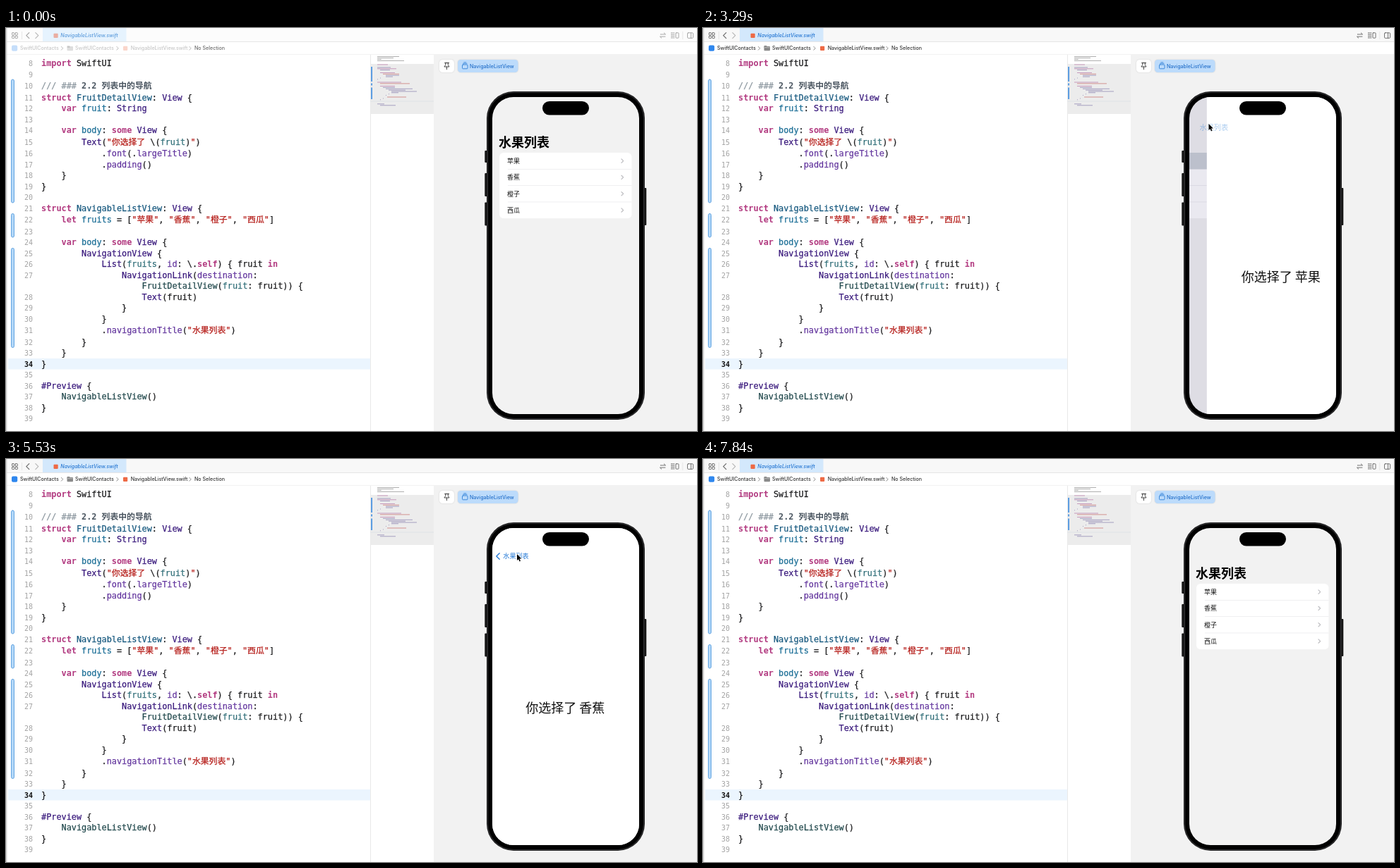
Write an HTML page with a canvas that moves like this. It is 979 by 572 pixels and loops after 7.98 s.

```html
<!DOCTYPE html>
<html lang="zh-CN">
<head>
<meta charset="utf-8">
<title>列表中的导航</title>
<style>
html, body { margin: 0; width: 100%; height: 100%; overflow: hidden; background: #fff; }
canvas { display: block; width: 979px; height: 572px; }
</style>
</head>
<body>
<canvas id="stage"></canvas>
<script>
const W = 979, H = 572, LOOP = 7980, STEP = 70;
const canvas = document.getElementById('stage');
const c = canvas.getContext('2d');
const dpr = window.devicePixelRatio || 1;
canvas.width = W * dpr;
canvas.height = H * dpr;

const CJK = '"Noto Sans CJK SC", "Noto Sans CJK", sans-serif';
const UI = 'Inter, ' + CJK;
const MONO = '"DejaVu Sans Mono", "Noto Sans CJK SC", "Noto Sans CJK", monospace';
const BLUE = [36, 121, 214];

const clamp = v => Math.max(0, Math.min(1, v));
const lerp = (a, b, k) => a + (b - a) * k;

function rect(x, y, w, h, fill) {
  c.fillStyle = fill;
  c.fillRect(x, y, w, h);
}

function round(x, y, w, h, r, fill, stroke, width = 1) {
  c.beginPath();
  c.roundRect(x, y, w, h, r);
  if (fill) { c.fillStyle = fill; c.fill(); }
  if (stroke) { c.strokeStyle = stroke; c.lineWidth = width; c.stroke(); }
}

function line(points, color, width = 1) {
  c.beginPath();
  for (let i = 0; i < points.length; i += 2) c.lineTo(points[i], points[i + 1]);
  c.strokeStyle = color;
  c.lineWidth = width;
  c.lineCap = c.lineJoin = 'round';
  c.stroke();
}

// dir: 1 points right, -1 points left
function chevron(x, y, s, dir, color, width) {
  line([x - dir * s / 2, y - s, x + dir * s / 2, y, x - dir * s / 2, y + s], color, width);
}

function text(s, x, y, font, color, align = 'left') {
  c.font = font;
  c.fillStyle = color;
  c.textAlign = align;
  c.fillText(s, x, y);
}

// ---- code editor ----
const INK = {
  k: '#b23a80', d: '#17597f', v: '#1b6e96', b: '#1c1c1e', t: '#3a1a7d',
  m: '#65389f', s: '#b51c18', u: '#33707a', p: '#234a4e', c: '#8c979f', h: '#4b5661'
};
const CODE = [
  '~kimport ~bSwiftUI',
  '',
  '~c/// ### ~h2.2 列表中的导航',
  '~kstruct ~dFruitDetailView~b: ~tView~b {',
  '    ~kvar ~vfruit~b: ~tString',
  '',
  '    ~kvar ~vbody~b: ~ksome ~tView~b {',
  '        ~tText~b(~s"你选择了 ~b\\(~ufruit~b)~s"~b)',
  '            ~b.~mfont~b(.~mlargeTitle~b)',
  '            ~b.~mpadding~b()',
  '    ~b}',
  '~b}',
  '',
  '~kstruct ~dNavigableListView~b: ~tView~b {',
  '    ~klet ~vfruits~b = [~s"苹果"~b, ~s"香蕉"~b, ~s"橙子"~b, ~s"西瓜"~b]',
  '',
  '    ~kvar ~vbody~b: ~ksome ~tView~b {',
  '        ~tNavigationView~b {',
  '            ~tList~b(~ufruits~b, ~mid~b: \\.~kself~b) { fruit ~kin',
  '                ~tNavigationLink~b(~mdestination~b:',
  '                    ~pFruitDetailView~b(~ufruit~b: fruit)) {',
  '                    ~tText~b(fruit)',
  '                ~b}',
  '            ~b}',
  '            ~b.~mnavigationTitle~b(~s"水果列表"~b)',
  '        ~b}',
  '    ~b}',
  '~b}',
  '',
  '~t#Preview~b {',
  '    ~pNavigableListView~b()',
  '~b}',
  ''
];
const WRAPPED = 20;

function drawCode() {
  rect(0, 38, 516, H - 38, '#fff');
  rect(3, 469, 513, 15.5, '#ebf5fe');
  for (const [y, h] of [[73, 175], [263.5, 33.5], [312.5, 141]])
    round(7.5, y, 4, h, 2, '#b4d8f8', '#5a9fdf', 0.9);

  let top = 42.25;
  CODE.forEach((src, i) => {
    const height = /[\u4e00-\u9fff]/.test(src) ? 17.5 : 15.5;
    const y = top + height / 2 + 4.2;
    top += height;
    if (i !== WRAPPED) {
      const n = i + (i < WRAPPED ? 8 : 7);
      text(n, 38, y, (n === 34 ? 'bold ' : '') + '10px ' + MONO, n === 34 ? '#111' : '#a3a3a3', 'right');
    }
    let x = 50;
    const parts = src.split(/~(.)/);
    parts.forEach((part, j) => {
      if (j % 2) return;
      const kind = j ? parts[j - 1] : 'b';
      const bold = kind === 'k' || kind === 'h';
      text(part, x, y, (bold ? 'bold ' : '') + '11.85px ' + MONO, INK[kind]);
      if (!bold) {
        // a hairline outline gives the medium weight
        c.strokeStyle = INK[kind];
        c.lineWidth = 0.25;
        c.lineJoin = 'round';
        c.strokeText(part, x, y);
      }
      x += c.measureText(part).width;
    });
  });
}

function drawMinimap() {
  rect(516, 38, 90, H - 38, '#fff');
  rect(516, 51, 90, 71, '#ececec');
  rect(516, 38, 1, H - 38, '#e9e9e9');
  rect(516, 103.5, 90, 1, '#dfe3e7');
  for (const [y, h] of [[55, 21], [78.5, 3], [84.5, 16.5]]) rect(517.2, y, 1.8, h, '#4d94e0');
  for (const [y, w] of [[40, 31], [42, 23], [44, 6], [46, 38]]) rect(526, y, w, 0.9, '#a5a5a5');
  // y, indent, width, tone
  const rows = [
    [51.5, 0, 15, 0], [55.5, 0, 19, 1], [57.3, 0, 27, 0], [59.1, 4, 14, 1], [63, 4, 21, 0],
    [64.8, 8, 23, 2], [66.7, 12, 19, 1], [68.6, 12, 10, 1], [70.5, 4, 1, 1], [72.3, 0, 1, 1],
    [76.5, 0, 34, 0], [78.4, 4, 42, 2], [82, 4, 21, 0], [83.9, 8, 17, 1], [85.8, 12, 38, 1],
    [87.7, 16, 24, 1], [89.5, 20, 36, 1], [91.3, 20, 10, 1], [93.2, 16, 1, 1], [95, 12, 1, 1],
    [97.5, 14, 27, 2], [99.5, 8, 1, 1], [101.3, 4, 1, 1], [107.3, 0, 10, 1], [109.3, 4, 22, 1]
  ];
  const tones = ['#c79abb', '#a59fc0', '#d3928f'];
  for (const [y, x, w, tone] of rows) rect(526 + x, y, w, 1, tones[tone]);
}

function drawBars(active) {
  const faint = active ? 1 : 0.28;
  rect(0, 0, W, 19.5, active ? '#f8f8f8' : '#fcfcfc');
  rect(52, 0, 118.5, 19.5, active ? '#d3e8fc' : '#e6f3fe');
  rect(0, 19, W, 1, '#e6e6e6');
  rect(0, 20, W, 18, '#fff');
  rect(0, 37.3, W, 0.7, '#ececec');

  const gray = active ? '#656565' : '#a0a0a0';
  for (const x of [8.5, 13.2]) for (const y of [6.7, 11.3]) round(x, y, 3.3, 3.3, 0.7, null, gray, 0.9);
  chevron(30.8, 10.7, 4, -1, gray, 1.1);
  chevron(43.8, 10.7, 4, 1, '#b4b4b4', 1.1);
  rect(22, 5, 0.7, 11, '#dedede');

  line([927, 9, 934.5, 9, 932.3, 7], gray, 0.9);
  line([934, 12.2, 926.5, 12.2, 928.7, 14.2], gray, 0.9);
  for (const y of [7, 9.3, 11.6, 13.9]) line([942, y, 947, y], gray, 0.9);
  round(949, 6.8, 4, 7.4, 0.8, null, gray, 0.9);
  rect(958.5, 5, 0.7, 11, '#dedede');
  round(965.5, 6.8, 8, 7.6, 1.2, null, gray, 0.9);
  line([970.5, 7, 970.5, 14.2], gray, 0.9);

  c.globalAlpha = active ? 1 : 0.5;
  round(67.5, 7.7, 6.2, 6.2, 1, '#ee6a45');
  c.globalAlpha = 1;
  text('NavigableListView.swift', 77.3, 13.3, 'italic 500 7.1px ' + UI, active ? '#2476d2' : '#5b9bdb');

  c.globalAlpha = faint;
  round(8, 24.5, 8.2, 8.2, 2, '#2f87ee');
  round(86.5, 26, 8.5, 6.2, 1, '#8a8a8a');
  round(86.5, 25, 4, 3, 0.8, '#8a8a8a');
  rect(87, 27.3, 7.5, 0.6, '#d0d0d0');
  round(166, 25.7, 6.2, 6.2, 1, '#ee6a45');
  const font = '500 7.1px ' + UI;
  text('SwiftUIContacts', 20, 31.3, font, '#333');
  text('SwiftUIContacts', 98, 31.3, font, '#333');
  text('NavigableListView.swift', 176.7, 31.3, font, '#333');
  c.globalAlpha = 1;
  text('No Selection', 267, 31.3, font, active ? '#333' : '#6a6a6a');
  for (const x of [79.5, 158, 261]) chevron(x, 28.8, 2.4, 1, active ? '#6f6f6f' : '#a8a8a8', 0.8);
  rect(0, 0, 1.5, H, '#d6d6d6');
}

// ---- preview pane ----
function drawPreviewPane() {
  rect(606, 38, W - 606, H - 38, '#f2f2f2');
  c.shadowColor = 'rgba(0,0,0,.16)';
  c.shadowBlur = 2 * dpr;
  round(614, 45, 21, 18, 4.5, '#fff');
  round(640, 45, 85.5, 18, 4.5, '#bcdbfb');
  c.shadowColor = 'transparent';
  line([621.5, 49.5, 627.5, 49.5], '#333', 1);
  line([622.8, 49.7, 622.6, 52.7, 620.9, 55, 628, 55, 626.4, 52.7, 626.2, 49.7], '#333', 0.9);
  line([624.5, 55, 624.5, 58.7], '#333', 0.9);
  round(646.5, 52, 7.5, 5.8, 1, null, '#2f7fd6', 0.9);
  line([647.5, 50.3, 653, 50.3], '#2f7fd6', 0.8);
  line([648.7, 48.8, 651.8, 48.8], '#2f7fd6', 0.8);
  text('NavigableListView', 657, 56.7, '500 7.1px ' + UI, '#236fc9');
}

function drawPhoneBody() {
  for (const [y, h] of [[174, 17], [206, 33], [247.5, 33]]) round(678.3, y, 4, h, 1, '#161616');
  round(903.5, 227, 3.8, 53, 1, '#161616');
  round(681, 90, 224, 466, 38, '#1d1d1e');
  round(682.5, 91.5, 221, 463, 36.5, '#030303', '#3c3c3e', 0.8);
  round(684, 93, 218, 460, 35, '#000');
}

const FRUITS = ['苹果', '香蕉', '橙子', '西瓜'];
const ROW = 23.3, LIST_TOP = 177;

function drawList(shift, selected, glow) {
  c.save();
  c.translate(shift, 0);
  c.save();
  c.beginPath();
  c.roundRect(699, LIST_TOP, 187.5, ROW * 4, 6);
  c.clip();
  rect(699, LIST_TOP, 188, ROW * 4, '#fff');
  for (let i = 1; i < 4; i++) rect(711, LIST_TOP + i * ROW - 0.3, 176, 0.7, '#e9e9eb');
  if (glow > 0) {
    c.globalAlpha = glow;
    rect(699, LIST_TOP + selected * ROW, 188, ROW, '#cdd2d8');
  }
  c.restore();
  FRUITS.forEach((name, i) => {
    const y = LIST_TOP + (i + 0.5) * ROW;
    text(name, 710, y + 3.5, '500 9px ' + CJK, '#111');
    chevron(873.3, y, 2.7, 1, '#b9b9bd', 1.1);
  });
  c.restore();
}

// The large title shrinks into the back button as the detail page arrives.
function drawTitle(p, popping, pressed) {
  const size = lerp(18, 9.1, p);
  const k = clamp(p * 1.4);
  const rgb = BLUE.map(v => Math.round(v * k));
  const weight = p > 0.8 ? 400 : p > 0.4 ? 500 : 700;
  const pushAlpha = 1 - 0.8 * p * (1 - p);
  c.globalAlpha = pressed ? 0.35 : popping ? lerp(1, 0.3, p) : pushAlpha;
  text('水果列表', lerp(698, 704.3, p), lerp(162.3, 138, p) + size * 0.37, weight + ' ' + size + 'px ' + CJK, `rgb(${rgb})`);
  c.globalAlpha *= clamp((p - 0.9) * 10) * (popping && !pressed ? 0.2 : 1);
  chevron(697, 138, 4.3, -1, `rgb(${BLUE})`, 1.4);
  c.globalAlpha = 1;
}

function drawScreen({ p, selected, glow, popping, pressed }) {
  c.save();
  c.beginPath();
  c.roundRect(689, 98, 208, 450, 30);
  c.clip();
  rect(689, 98, 208, 450, '#f2f2f2');
  if (p < 0.999) drawList(-62 * p, selected, glow);
  if (p > 0.001) {
    if (p < 0.999) rect(689, 98, 208, 450, `rgba(20,6,85,${0.1 * p})`);
    const dx = 208 * (1 - p);
    rect(689 + dx, 98, 208, 450, '#fff');
    text('你选择了 ' + FRUITS[selected], (selected ? 736.3 : 738) + dx, 360.3, '400 18px ' + CJK, '#111');
  }
  drawTitle(p, popping, pressed);
  c.restore();
  round(760, 104, 66, 19.5, 9.75, '#000');
}

// ---- timeline ----
const VISITS = [
  { row: 0, press: 1630, push: 1694, tap: 3220, pop: 3253 },
  { row: 1, press: 4470, push: 4485, tap: 5950, pop: 5983 }
];

// critically damped spring
function spring(ms) {
  const x = Math.max(0, ms) * 0.016;
  return 1 - (1 + x) * Math.exp(-x);
}

function screenAt(t) {
  const v = VISITS[t < VISITS[1].press ? 0 : 1];
  const popping = t >= v.tap;
  let p = popping ? 1 - spring(t - v.pop) : spring(t - v.push);
  if (p < 0.003) p = 0;
  if (p > 0.998) p = 1;
  const glow = t < v.press ? 0 : popping ? clamp(p * 1.5) : 1;
  return { p, selected: v.row, glow, popping, pressed: popping && t < v.pop };
}

const PATH = [
  [560, 517, 420], [1190, 765, 188],
  [2450, 765, 188], [2800, 716.5, 136],
  [3600, 716.5, 136], [4060, 769.5, 211],
  [4830, 769.5, 211], [5530, 724, 135],
  [6300, 724, 135], [6720, 679.5, 206], [7000, 517, 400]
];

function drawCursor(t) {
  const i = PATH.findIndex(k => k[0] > t);
  if (i < 1) return;
  const [t0, x0, y0] = PATH[i - 1], [t1, x1, y1] = PATH[i];
  const u = (t - t0) / (t1 - t0), k = u * u * (3 - 2 * u);
  c.save();
  c.translate(lerp(x0, x1, k), lerp(y0, y1, k));
  const arrow = new Path2D('M0 0V9L2.1 7.2L3.5 10.4L5 9.8L3.6 6.6H6.4Z');
  c.lineJoin = 'round';
  c.lineWidth = 1.4;
  c.strokeStyle = '#fff';
  c.stroke(arrow);
  c.fillStyle = '#000';
  c.fill(arrow);
  c.restore();
}

function draw(t) {
  c.setTransform(dpr, 0, 0, dpr, 0, 0);
  drawCode();
  drawMinimap();
  drawPreviewPane();
  drawBars(t >= 1610);
  drawPhoneBody();
  drawScreen(screenAt(t));
  drawCursor(t);
}

const start = performance.now();
let shown = -1;
function tick() {
  const t = Math.floor((performance.now() - start) % LOOP / STEP) * STEP;
  if (t !== shown) draw(shown = t);
  requestAnimationFrame(tick);
}
tick();
</script>
</body>
</html>
```
